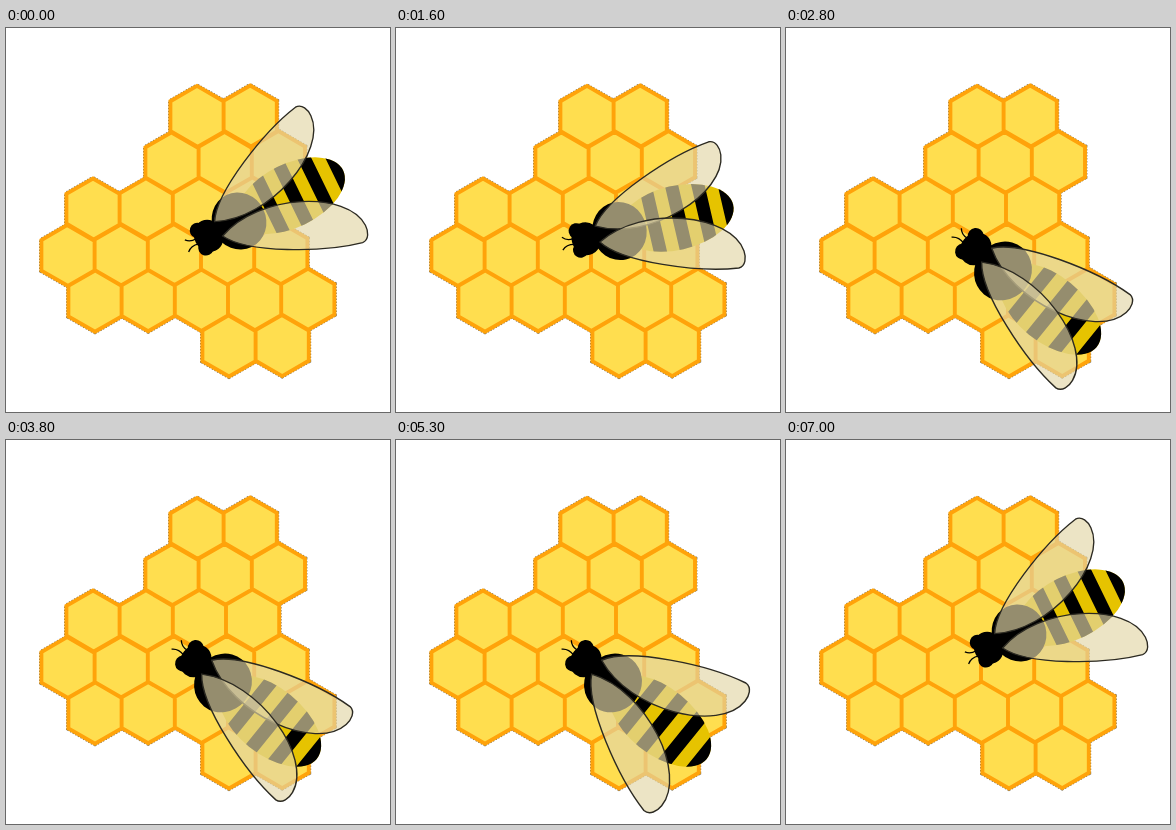
An HTML page that plays this animation: 384 px wide and 384 px high, repeating every 7.1 s.

```html
<!DOCTYPE html>
<html lang="en">
<head>
<meta charset="utf-8">
<title>Bee on honeycomb</title>
<style>
  html, body { margin: 0; height: 100%; overflow: hidden; background: #fff; }
  svg { display: block; width: 100vw; height: 100vh; }
</style>
</head>
<body>
<svg viewBox="0 0 384 384">
  <defs>
    <clipPath id="abdomenShape"><ellipse cx="60" rx="60" ry="33"/></clipPath>
    <path id="wing" d="M0 0C25-18 105-18 145-8C152-5 151 4 148 10C130 46 38 44 0 0Z"
      fill="rgb(226,215,168)" fill-opacity=".66" stroke="#2c2a22" stroke-width="1.4"/>
  </defs>
  <path id="combEdge" fill="none" stroke="#77705f" stroke-width="4.8" stroke-dasharray="1.5 1.5"/>
  <path id="comb" fill="#ffde4f" stroke="#ffa30a" stroke-width="3.9"/>
  <g id="bee">
    <g clip-path="url(#abdomenShape)">
      <rect y="-40" width="125" height="80" fill="#e6c300"/>
      <path d="M29.5 0H125" stroke="#000" stroke-width="80" stroke-dasharray="13.5 13"/>
    </g>
    <ellipse rx="28" ry="30"/>
    <path d="M-48-3Q-55-2-59-7M-48 3Q-56 1-61 6" fill="none" stroke="#000" stroke-width="1.3"/>
    <ellipse cx="-35" rx="15" ry="17"/>
    <circle cx="-43" cy="-10" r="8"/>
    <circle cx="-43" cy="10" r="8"/>
    <use id="leftWing" href="#wing"/>
    <use id="rightWing" href="#wing"/>
  </g>
</svg>
<script>
const LOOP = 7100, STEP = 100;
const byId = id => document.getElementById(id);
const clamp = value => Math.min(1, Math.max(0, value));

// Each row: x of its first cell, number of cells
const rows = [[191, 2], [166, 3], [87, 4], [62, 5], [89, 5], [223, 2]];
const RADIUS = 30.7, CELL_WIDTH = 53.2, ROW_HEIGHT = 45.9;

function hexagon(x, y) {
  const corners = Array.from({ length: 6 }, (_, i) => {
    const angle = (i + 0.5) * Math.PI / 3;
    return (x + RADIUS * Math.cos(angle)).toFixed(1) + ' ' + (y + RADIUS * Math.sin(angle)).toFixed(1);
  });
  return 'M' + corners.join('L') + 'Z';
}

const combPath = rows.map(([start, count], row) =>
  Array.from({ length: count }, (_, i) => {
    const x = start + i * CELL_WIDTH;
    return hexagon(x, 88.6 + row * ROW_HEIGHT - (x - 190) * 0.008);
  }).join('')).join('');
byId('comb').setAttribute('d', combPath);
byId('combEdge').setAttribute('d', combPath);

// Wing angles are in degrees from the body axis
const CLOSED = 10.6, PERCH_OPENING = 15, FLAP_OPENING = 23;
const FLAP_HALF_WIDTH = 550;
const flapPeaks = [1900, 2450, 3450, 5500, 6050];

const flap = offset => Math.cos(Math.PI / 2 * clamp(Math.abs(offset) / FLAP_HALF_WIDTH)) ** 2;

// 0 is tail up, 1 is tail down
const turnAt = time => clamp(Math.min(time - 1500, 6200 - time) / 500);

function wingAngle(time) {
  if (turnAt(time) > 0) {
    return CLOSED + FLAP_OPENING * flapPeaks.reduce((sum, peak) => sum + flap(time - peak), 0);
  }
  return CLOSED + PERCH_OPENING * (clamp(1 - time / 400) + clamp((time - 6800) / 200));
}

function draw(time) {
  const turn = turnAt(time);
  const angle = wingAngle(time);
  const x = 233 - 16 * turn - 40 * turn * (1 - turn);
  const y = 193 + 50 * turn;
  byId('bee').setAttribute('transform',
    `translate(${x} ${y}) rotate(${-26 + 65 * turn}) scale(${0.965 + 0.04 * turn})`);
  byId('leftWing').setAttribute('transform', `translate(-23 -10.5) rotate(${-angle})`);
  byId('rightWing').setAttribute('transform', `translate(-22 6.5) rotate(${angle}) scale(1 -1)`);
}

function tick() {
  draw(Math.floor(performance.now() % LOOP / STEP) * STEP);
  requestAnimationFrame(tick);
}
tick();
</script>
</body>
</html>
```
